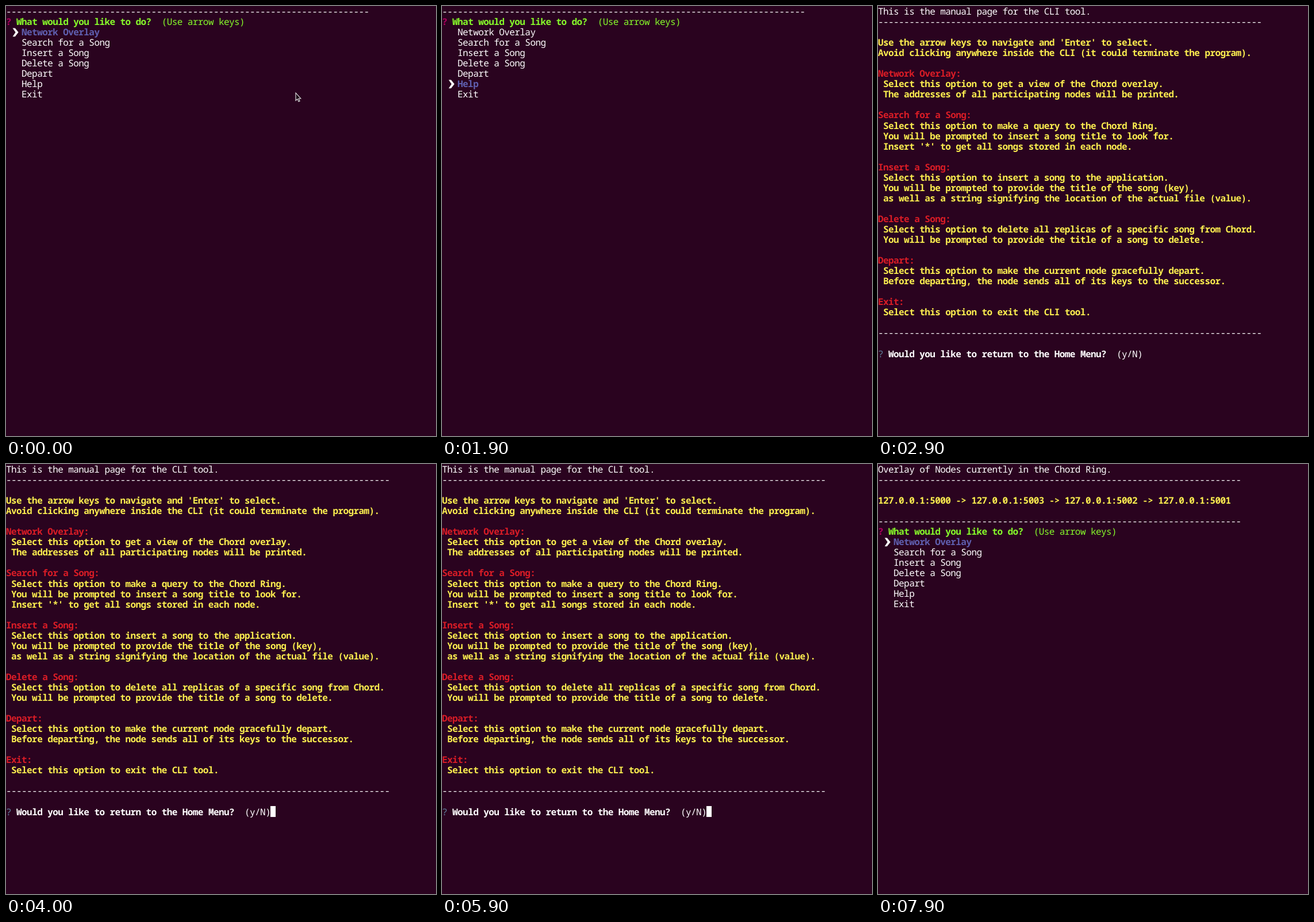
Write an HTML page that moves like this. It is 748 by 748 pixels and loops after 8000 ms.

```html
<!DOCTYPE html>
<html lang="en">
<head>
<meta charset="utf-8">
<title>Terminal menu</title>
<style>
  html, body { margin: 0; width: 100%; height: 100%; overflow: hidden; background: #2a031f; }
  pre {
    position: absolute; left: 0; top: 0; margin: 0;
    font: 16px/18.04px "Noto Sans Mono", "DejaVu Sans Mono", monospace;
    letter-spacing: -0.578px;
    text-rendering: geometricPrecision;
    color: #fff;
  }
  b { font-weight: 700; }
  .green { color: #87fb2a; }
  .mark { color: #af005f; }
  .yellow { color: #fcee4f; }
  .red { color: #d91c26; }
  .blue { color: #5f819d; }
  svg { position: absolute; left: 0; top: 0; overflow: visible; }

  /* every change is a hard cut on one shared 8 s clock */
  .menu, .menu i, .arrow, .help, .caret, .nodes, .mouse {
    animation: 8s step-end infinite;
  }
  .menu i { font-style: normal; }
  .menu { animation-name: menu; }
  .arrow { animation-name: arrow; }
  .help { animation-name: help; }
  .caret { animation-name: blink; }
  .nodes { animation-name: nodes; }
  .mouse { animation-name: mouse; }
  .menu .overlay { animation-name: pick-overlay; }
  .menu .search { animation-name: pick-search; }
  .menu .delete { animation-name: pick-delete; }
  .menu .manual { animation-name: pick-manual; }

  .caret { position: absolute; left: 460px; top: 595px; width: 9px; height: 19px; background: #fff; }

  @keyframes mouse { 0% { opacity: 1; } 7.5%, 100% { opacity: 0; } }
  @keyframes menu {
    0% { opacity: 1; top: 0; }
    31.25% { opacity: 0; top: 0; }
    81.25% { opacity: 1; top: 0; }
    98.75%, 100% { opacity: 1; top: 90px; }
  }
  @keyframes help { 0%, 81.25%, 100% { opacity: 0; } 31.25% { opacity: 1; } }
  @keyframes nodes { 0% { opacity: 0; } 98.75%, 100% { opacity: 1; } }
  @keyframes arrow {
    0%, 31.25%, 100% { transform: translateY(0); }
    12.5% { transform: translateY(18px); }
    16.25% { transform: translateY(54px); }
    23.75% { transform: translateY(90px); }
  }
  @keyframes blink {
    0%, 50%, 58.75%, 73.75%, 100% { opacity: 1; }
    36.25%, 51.25%, 67.5% { opacity: 0; }
  }
  @keyframes pick-overlay {
    0%, 31.25%, 100% { color: #5f5faf; font-weight: 700; }
    12.5% { color: #fff; font-weight: 400; }
  }
  @keyframes pick-search {
    0%, 16.25%, 100% { color: #fff; font-weight: 400; }
    12.5% { color: #5f5faf; font-weight: 700; }
  }
  @keyframes pick-delete {
    0%, 23.75%, 100% { color: #fff; font-weight: 400; }
    16.25% { color: #5f5faf; font-weight: 700; }
  }
  @keyframes pick-manual {
    0%, 31.25%, 100% { color: #fff; font-weight: 400; }
    23.75% { color: #5f5faf; font-weight: 700; }
  }
</style>
</head>
<body>

<pre class="nodes">Overlay of Nodes currently in the Chord Ring.
----------------------------------------------------------------------

<b class="yellow">127.0.0.1:5000 -&gt; 127.0.0.1:5003 -&gt; 127.0.0.1:5002 -&gt; 127.0.0.1:5001</b></pre>

<pre class="menu">----------------------------------------------------------------------
<b class="mark">?</b> <b class="green">What would you like to do?</b>  <span class="green">(Use arrow keys)</span>
   <i class="overlay">Network Overlay</i>
   <i class="search">Search for a Song</i>
   Insert a Song
   <i class="delete">Delete a Song</i>
   Depart
   <i class="manual">Help</i>
   Exit<svg width="24" height="60"><path class="arrow" fill="#fff" d="M11.6 38.4H15.8L21.6 45.8L15.8 53.2H11.6L16.6 45.8Z"/></svg></pre>

<div class="help">
<pre>This is the manual page for the CLI tool.
--------------------------------------------------------------------------

<b class="yellow">Use the arrow keys to navigate and 'Enter' to select.
Avoid clicking anywhere inside the CLI (it could terminate the program).

<span class="red">Network Overlay:</span>
 Select this option to get a view of the Chord overlay.
 The addresses of all participating nodes will be printed.

<span class="red">Search for a Song:</span>
 Select this option to make a query to the Chord Ring.
 You will be prompted to insert a song title to look for.
 Insert '*' to get all songs stored in each node.

<span class="red">Insert a Song:</span>
 Select this option to insert a song to the application.
 You will be prompted to provide the title of the song (key),
 as well as a string signifying the location of the actual file (value).

<span class="red">Delete a Song:</span>
 Select this option to delete all replicas of a specific song from Chord.
 You will be prompted to provide the title of a song to delete.

<span class="red">Depart:</span>
 Select this option to make the current node gracefully depart.
 Before departing, the node sends all of its keys to the successor.

<span class="red">Exit:</span>
 Select this option to exit the CLI tool.</b>

--------------------------------------------------------------------------

<span class="blue">?</span> <b>Would you like to return to the Home Menu?</b>  (y/N)</pre>
<div class="caret"></div>
</div>

<svg class="mouse" width="748" height="748">
  <path d="M504 151.2V164.4L506.9 161.8L509 166.3L511 165.4L509 161H512.8Z"
    fill="#1c0a17" stroke="#e8e8e8" stroke-width="1.1"/>
</svg>

</body>
</html>
```
